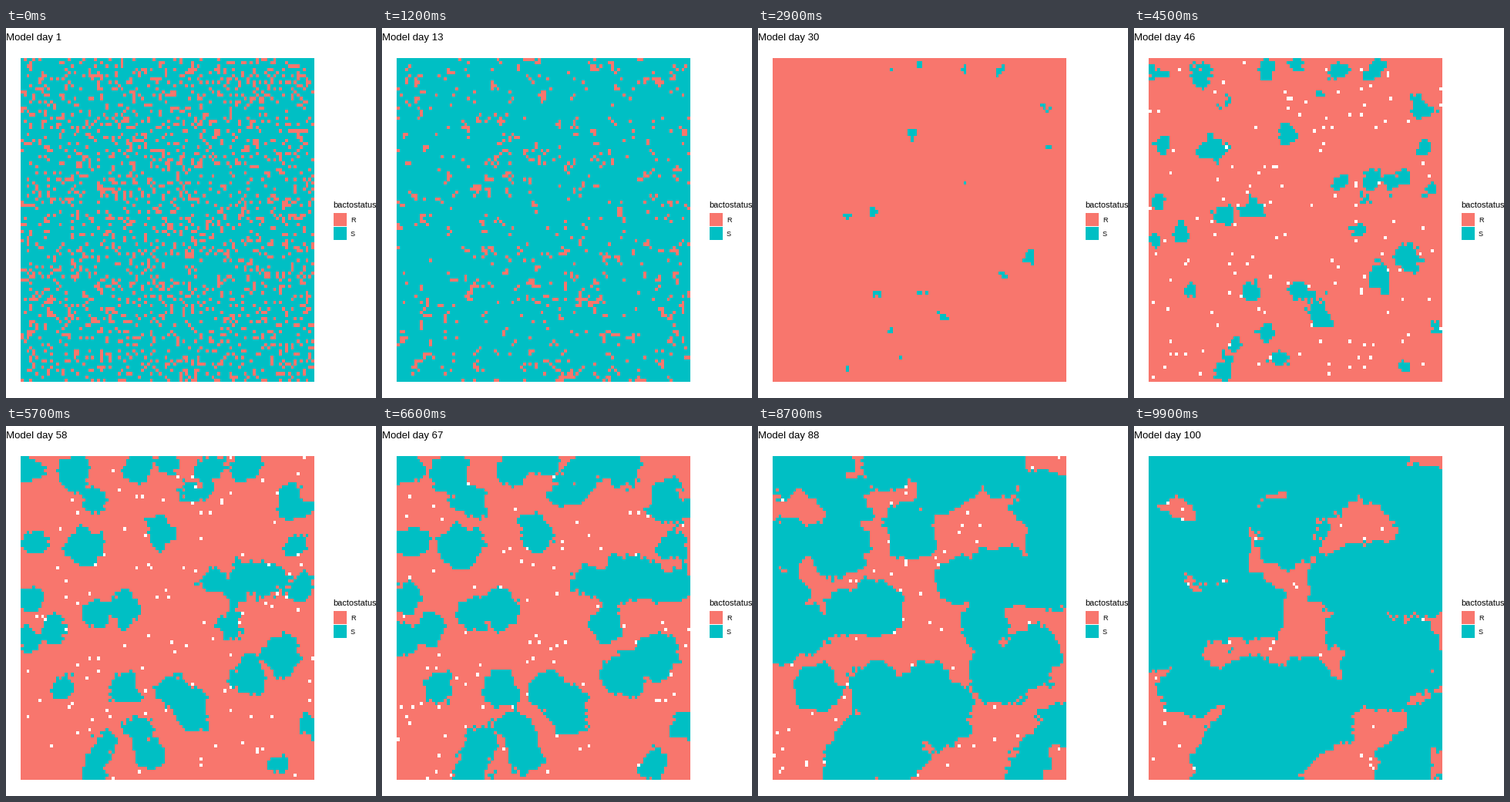
A matplotlib script for the animation above (10000 ms loop, 480 px wide and 480 px high).

```python
import numpy as np
import matplotlib.pyplot as plt
from matplotlib.animation import FuncAnimation
from matplotlib.colors import ListedColormap
from matplotlib.patches import Rectangle

SIZE, DPI, DAYS, N = 480, 100, 100, 100
LEFT, TOP, WIDTH, HEIGHT = 19, 39, 381, 420
RED, TEAL = "#F8766D", "#00BFC4"
R, S, EMPTY = 0, 1, 2
TREATED, RELEASE = 16, 30  # first and last day of treatment
DEATH = 0.014              # daily share of resistant cells found dead
FRONT = 16                 # pixels a colony edge advances per unit of arrival

rng = np.random.default_rng(7)
X, Y = np.meshgrid(LEFT + (np.arange(N) + 0.5) * WIDTH / N,
                   TOP + (np.arange(N) + 0.5) * HEIGHT / N)

# Centres and radii of the sensitive colonies that grow back
COLONIES = [
    (30, 58, 17), (87, 62, 18), (118, 98, 15), (172, 52, 15), (209, 46, 12),
    (262, 60, 20), (240, 84, 15), (313, 54, 18), (200, 136, 20),
    (102, 155, 24), (36, 152, 15), (372, 98, 22), (376, 155, 13),
    (380, 205, 17), (268, 199, 17), (302, 198, 26), (338, 200, 24),
    (294, 256, 17), (355, 300, 24), (318, 322, 23), (32, 222, 15),
    (25, 275, 19), (58, 265, 17), (120, 243, 17), (150, 237, 19),
    (154, 345, 19), (77, 340, 12), (218, 345, 20), (238, 370, 27),
    (172, 390, 18), (132, 406, 14), (186, 428, 18), (117, 442, 19),
    (393, 387, 12), (352, 438, 14),
]


def neighbours(grid):
    return sum(np.roll(grid, (i, j), (0, 1))
               for i in (-1, 0, 1) for j in (-1, 0, 1) if i or j)


def lumps(passes=3):
    noise = rng.normal(size=(N, N))
    for _ in range(passes):
        noise = (noise + neighbours(noise)) / 9
    return noise / noise.std()


def arrival_order():
    """Low where sensitive cells return first, high where they come last."""
    order = np.full((N, N), np.inf)
    for x, y, r in COLONIES:
        d = np.hypot(X - x, Y - y)
        order = np.minimum(order, np.where(d < r, d / r, 1 + (d - r) / FRONT))
    return order + 0.22 * lumps() + 0.1 * rng.normal(size=(N, N))


def sensitive(day):
    share = np.interp(day, [30, 46, 58, 77, 100], [0.008, 0.1, 0.25, 0.49, 0.8])
    return order < np.quantile(order, share)


def simulate():
    """Resistance fades, sweeps the plate under treatment, then retreats."""
    safe = sensitive(RELEASE)
    resistant = (rng.random((N, N)) < 0.2) & ~safe
    for day in range(1, DAYS + 1):
        near = neighbours(resistant.astype(int))
        roll = rng.random((N, N))
        if day >= RELEASE:
            resistant = ~sensitive(day)
        elif day >= TREATED:
            rate = 0.08 + 0.4 * ((day - TREATED) / (RELEASE - TREATED)) ** 2
            resistant = resistant | (~safe & (roll > (1 - rate) ** near))
        elif day > 1:
            lost = resistant & (roll < 0.17 * (8 - near) / 8)
            won = ~resistant & ~safe & (roll < 0.08 * near / 8)
            resistant = (resistant & ~lost) | won
        grid = np.where(resistant, R, S)
        if day > RELEASE:
            grid[resistant & (rng.random((N, N)) < DEATH)] = EMPTY
        yield grid


order = arrival_order()
grids = list(simulate())

fig = plt.figure(figsize=(SIZE / DPI, SIZE / DPI), dpi=DPI, facecolor="white")
stage = fig.add_axes([0, 0, 1, 1])
stage.set(xlim=(0, SIZE), ylim=(SIZE, 0))
stage.axis("off")


def label(x, y, text, px):
    return stage.text(x, y, text, fontsize=px * 72 / DPI, color="black",
                      family="Liberation Sans", va="baseline")


title = label(0, 16, "", 13.2)
label(424, 233, "bactostatus", 11)
for name, color, y in (("R", RED, 240), ("S", TEAL, 258)):
    stage.add_patch(Rectangle((425, y), 17, 17, color=color, lw=0))
    label(447, y + 12, name, 9)

plate = fig.add_axes([LEFT / SIZE, 1 - (TOP + HEIGHT) / SIZE,
                      WIDTH / SIZE, HEIGHT / SIZE])
plate.axis("off")
image = plate.imshow(grids[0], cmap=ListedColormap([RED, TEAL, "white"]),
                     vmin=0, vmax=2, aspect="auto", interpolation="nearest")


def update(i):
    title.set_text(f"Model day {i + 1}")
    image.set_data(grids[i])
    return title, image


anim = FuncAnimation(fig, update, frames=DAYS, interval=100, repeat=True)
plt.show()
```
